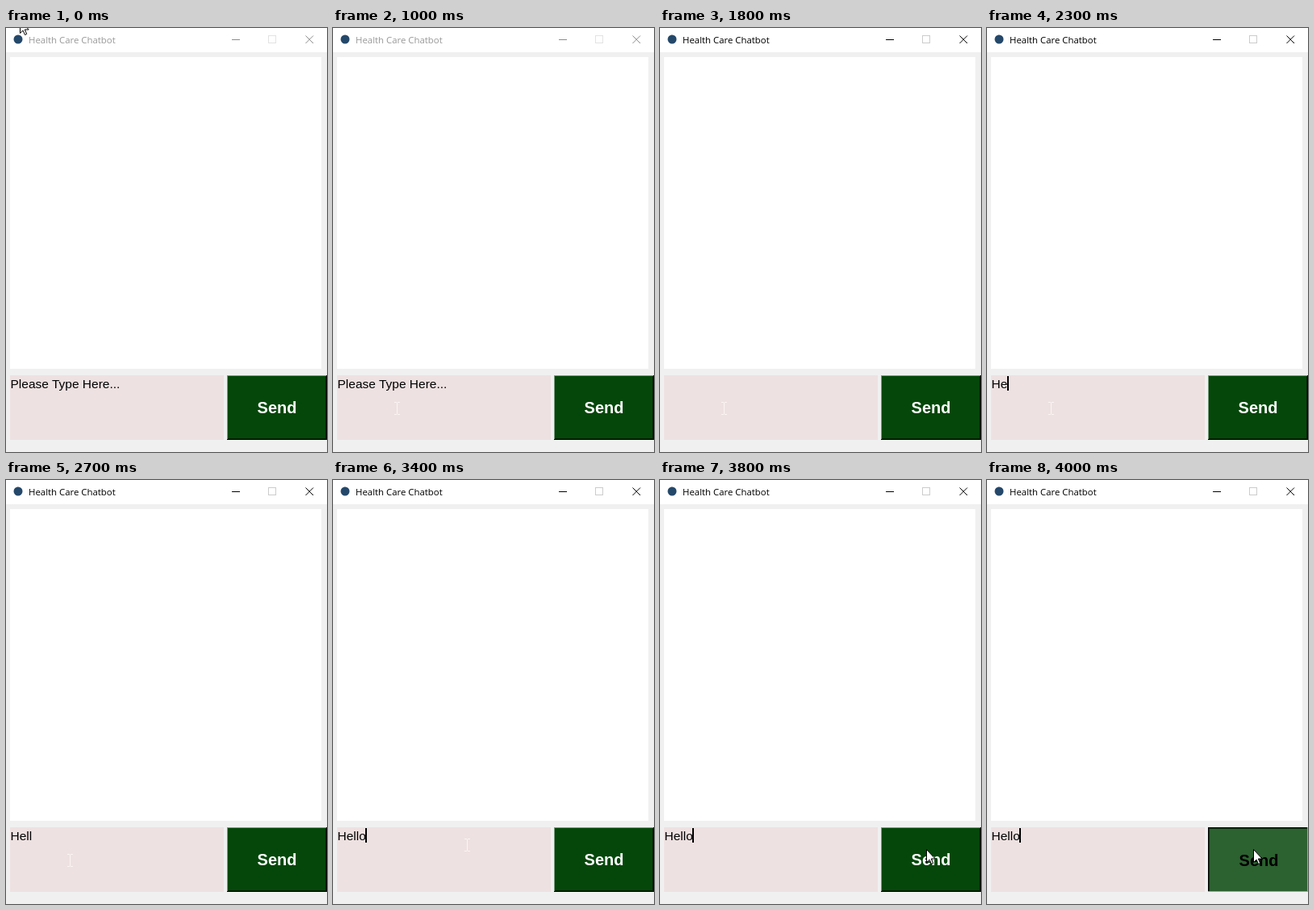
An HTML page for the animation above (8 s loop, 398 by 525 pixels).

```html
<!DOCTYPE html>
<html lang="en">
<head>
<meta charset="utf-8">
<title>Chat window</title>
<style>
  html, body { margin: 0; width: 398px; height: 525px; overflow: hidden; background: #f0f0f0; }
  svg { display: block; }
  .crisp { shape-rendering: crispEdges; }
  text { white-space: pre; }
  #title { font: 11.4px "Open Sans", "Noto Sans", sans-serif; }
  #entry { font: 15.5px "Liberation Sans", Arial, sans-serif; }
  #label { font: bold 20px "Liberation Sans", Arial, sans-serif; text-anchor: middle; }
</style>
</head>
<body>
<svg width="398" height="525" viewBox="0 0 398 525">
  <rect width="398" height="30" fill="#fff"/>
  <circle cx="15" cy="14" r="5.5" fill="#24486a"/>
  <text id="title" x="28" y="19">Health Care Chatbot</text>
  <g fill="none">
    <path id="controls" d="M280 14.5h10M371.5 9.5l9.5 9.5M381 9.5l-9.5 9.5"/>
    <rect id="maximize" x="325.5" y="9.5" width="9" height="9"/>
  </g>

  <rect x="5" y="36" width="386" height="386" fill="#fff"/>
  <rect x="5" y="430" width="265" height="80" fill="#eee1e1"/>
  <text id="entry" x="5.5" y="446"></text>
  <rect id="caret" class="crisp" y="431" height="18"/>

  <g class="crisp">
    <rect id="face" x="274" y="430" width="124" height="80"/>
    <g id="raised" fill="none">
      <path d="M274 430.5h124M274.5 430v80" stroke="#7d9c7f"/>
      <path d="M275 508.5h122M396.5 431v78" stroke="#032605"/>
      <path d="M274 509.5h124M397.5 430v80" stroke="#000"/>
    </g>
    <g id="sunken" fill="none">
      <path d="M274 430.5h124M274.5 430v80" stroke="#000"/>
      <path d="M275 431.5h122M275.5 431v78" stroke="#123015"/>
      <path d="M274 509.5h124M397.5 430v80" stroke="#8fae91"/>
    </g>
  </g>
  <text id="label">Send</text>

  <path id="beam" class="crisp" d="M-3 .5h3m1 0h3M.5 1v14M-3 15.5h3m1 0h3" fill="none" stroke="#fbf5f5"/>
  <path id="arrow" d="M.5 .5v16l3.6-3.4 2.4 5.4 2.2-1-2.4-5.5h4.9z" fill="#fff" stroke="#000"/>
</svg>
<script>
const LOOP = 8000;
const $ = id => document.getElementById(id);
const set = (id, attrs) => {
  for (const name in attrs) $(id).setAttribute(name, attrs[name]);
};
const show = (id, on) => set(id, { visibility: on ? "visible" : "hidden" });

// Each track is a list of [start time, value...] held until the next entry.
const texts = [
  [0, "Please Type Here..."], [1200, ""], [2000, "H"], [2300, "He"],
  [2500, "Hel"], [2700, "Hell"], [2900, "Hello"]
];
const carets = [
  [0, false], [1200, true], [1800, false], [2100, true], [2700, false],
  [3000, true], [3600, false], [3800, true]
];
const pointers = [
  [0, "arrow", 17, -10], [500, "", 0, 0], [900, "beam", 78, 456],
  [1000, "beam", 79, 463], [3400, "beam", 166, 444], [3500, "beam", 234, 439],
  [3600, "arrow", 297, 448], [3700, "arrow", 322, 454], [3800, "arrow", 330, 457]
];
const caretEnds = [6, 17, 26, 29, 32, 41];

const at = (track, t) => track.filter(step => step[0] <= t).pop().slice(1);

function draw(t) {
  const focused = t >= 1200;
  const pressed = t >= 4000;
  const [text] = at(texts, t);
  const [caretOn] = at(carets, t);
  const [pointer, x, y] = at(pointers, t);

  set("title", { fill: focused ? "#000" : "#999" });
  set("controls", { stroke: focused ? "#000" : "#8c8c8c" });
  set("maximize", { stroke: focused ? "#ccc" : "#e3e3e3" });

  $("entry").textContent = text;
  show("caret", caretOn);
  if (caretOn) {
    const end = caretEnds[text.length];
    set("caret", text ? { x: end - 1, width: 2 } : { x: end, width: 1 });
  }

  set("face", { fill: pressed ? "#2c6130" : "#05470a" });
  show("raised", !pressed);
  show("sunken", pressed);
  set("label", {
    x: pressed ? 337 : 336,
    y: pressed ? 478 : 477,
    fill: pressed ? "#000" : "#fff"
  });

  for (const id of ["arrow", "beam"]) {
    show(id, id === pointer);
    set(id, { transform: `translate(${x} ${y})` });
  }
}

function tick() {
  draw(performance.now() % LOOP);
  requestAnimationFrame(tick);
}
tick();
</script>
</body>
</html>
```
